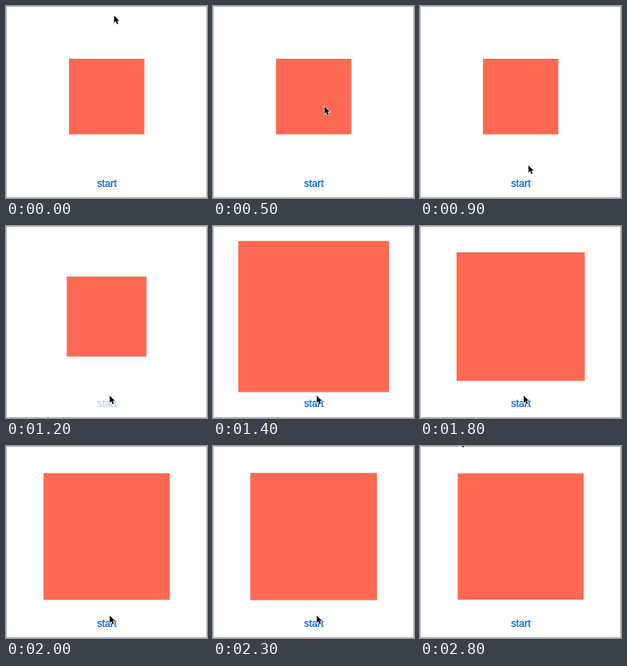
These frames come from a looping animation (252x240 px, 2.9 s). An HTML page:

```html
<!DOCTYPE html>
<html lang="en">
<head>
<meta charset="utf-8">
<title>Spring square</title>
<style>
  html, body { margin: 0; width: 100%; height: 100%; overflow: hidden; background: #fff; }
  svg { display: block; width: 252px; height: 240px; }
  text { font: 12.6px "Liberation Sans", Arial, sans-serif; text-anchor: middle; }
</style>
</head>
<body>
<svg viewBox="0 0 252 240">
  <rect x=".5" y=".5" width="251" height="239" fill="#fff" stroke="#b4b4b4"/>
  <rect id="square" fill="#ff6954"/>
  <text id="label" x="126.5" y="226" fill="#0a64d8" stroke="#0a64d8" stroke-width=".3">start</text>
  <path id="cursor" d="M0 0V11.2L2.6 8.9 4.6 13.4 6.6 12.5 4.7 8.2H8.2Z"
        stroke="#fff" stroke-width="1.6" paint-order="stroke"/>
</svg>
<script>
const LOOP = 2900, STEP = 100;
const CENTER = { x: 126.2, y: 113.2 };
const START_SIZE = 94.5, END_SIZE = 157.5;
const DECAY = 0.2206, SPEED = 0.0133, RELEASE = 1168;

const [square, label, cursor] = ["square", "label", "cursor"].map(id => document.getElementById(id));

// Eased progress from 0 to 1 between two times
const ease = (t, from, to, power = 1) =>
  Math.min(1, Math.max(0, (t - from) / (to - from))) ** power;

// Underdamped spring
function squareSize(t) {
  const phase = Math.max(0, t - RELEASE) * SPEED;
  const offset = Math.exp(-DECAY * phase) * (Math.cos(phase) + DECAY * Math.sin(phase));
  return END_SIZE + (START_SIZE - END_SIZE) * offset;
}

// Sweep down, settle on the label, then leave through the top
function cursorPosition(t) {
  const settle = ease(t, 700, 1100, 0.8), leave = ease(t, 2400, 2800, 2);
  return {
    x: 135.5 + 8.5 * ease(t, 400, 600) - 14 * settle - 80 * leave,
    y: 12 + 170 * ease(t, 400, 600, 0.58) + 30 * settle - 221 * leave
  };
}

const labelOpacity = t => t < 1100 ? 1 : 0.28 + 0.72 * ease(t, 1200, 1400);

function draw(now) {
  const t = Math.floor(now % LOOP / STEP) * STEP;

  const size = squareSize(t);
  square.setAttribute("x", CENTER.x - size / 2);
  square.setAttribute("y", CENTER.y - size / 2);
  square.setAttribute("width", size);
  square.setAttribute("height", size);

  label.setAttribute("opacity", labelOpacity(t));
  const { x, y } = cursorPosition(t);
  cursor.setAttribute("transform", `translate(${x} ${y}) scale(0.8)`);
}

const begin = performance.now();
function frame() {
  draw(performance.now() - begin);
  requestAnimationFrame(frame);
}
frame();
</script>
</body>
</html>
```
